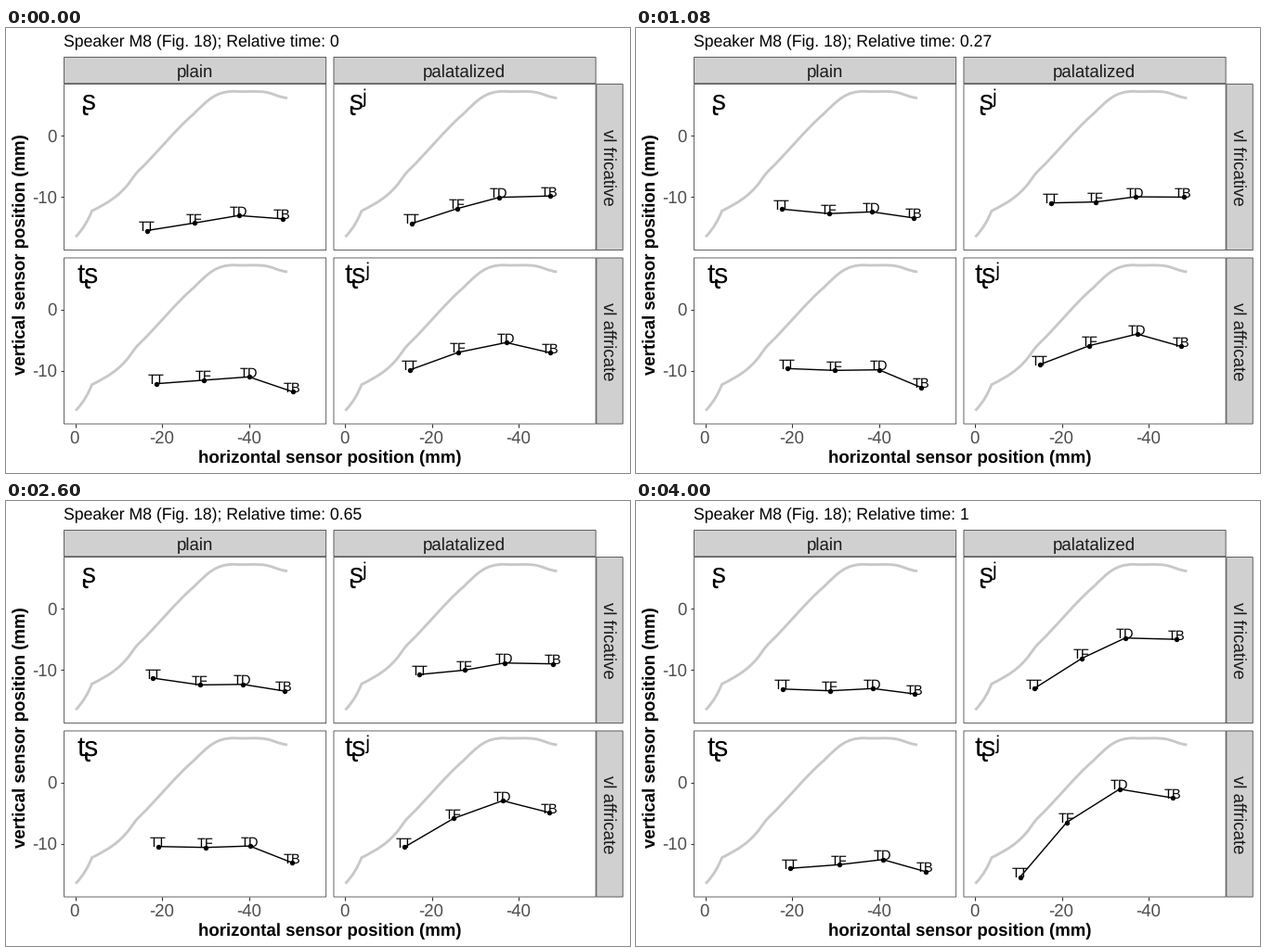
Write a matplotlib script that moves like this. It is 672 by 480 pixels and loops after 4040 ms.

```python
import numpy as np
import matplotlib.pyplot as plt
from matplotlib.animation import FuncAnimation
from matplotlib.patches import PathPatch, Rectangle
from matplotlib.path import Path

plt.rcParams["font.family"] = ["Liberation Sans", "DejaVu Sans"]
plt.rcParams["text.hinting"] = "no_hinting"

W, H, DPI = 672, 480, 96
FRAMES = 101
PX = 72 / DPI  # points per pixel

fig = plt.figure(figsize=(W / DPI, H / DPI), dpi=DPI, facecolor="white")
ax = fig.add_axes([0, 0, 1, 1])
ax.set(xlim=(0, W), ylim=(H, 0))
ax.axis("off")

COLS, ROWS = (62.2, 352.6), (60.2, 247.6)
PANEL_W, PANEL_H, STRIP = 282.9, 179.8, 29.1
INK, TICK_INK, STRIP_INK = "#333333", "#4D4D4D", "#1A1A1A"
SENSORS = ("TT", "TF", "TD", "TB")

# Palate outline in the first panel: start point, then Bezier triples
PALATE = np.array([
    (75, 225.3),
    (84, 216), (89, 206), (92.5, 197.3),
    (111, 188), (121, 181.5), (132, 168),
    (136, 162.5), (139, 157.5), (144, 152.8),
    (163, 134.5), (183, 109), (202, 92.8),
    (218, 77), (226, 68.3), (246, 68.3),
    (258, 69.3), (270, 67.3), (281, 69.5),
    (290, 71.5), (293, 74.3), (303, 75.6),
])


def label(x, y, s, size=14, color="black", **kw):
    opts = dict(ha="center", va="baseline", rotation_mode="anchor")
    return ax.text(x, y, s, fontsize=size, color=color, **{**opts, **kw})


def box(x, y, w, h, fill, lw=0.75):
    # The border lies just inside the box
    ax.add_patch(Rectangle((x + lw / 2, y + lw / 2), w - lw, h - lw, fc=fill,
                           ec=INK, lw=lw * PX, snap=False))


def tick(xs, ys):
    ax.plot(xs, ys, color=INK, lw=1.07 * PX, solid_capstyle="butt")


class Panel:
    """Sensors settle from `start` into `hold`, then leave for `end`."""

    def __init__(self, col, row, symbol, start, hold, end, settle, leave):
        x, y = COLS[col], ROWS[row]
        box(x, y, PANEL_W, PANEL_H, "white")
        curve = Path(PALATE + (x - COLS[0], y - ROWS[0]),
                     [Path.MOVETO] + [Path.CURVE4] * (len(PALATE) - 1))
        ax.add_patch(PathPatch(curve, fill=False, ec="#C8C8C8", lw=2.85 * PX,
                               capstyle="butt"))
        label(x + 26, y + 27.6, symbol, 22.4)
        self.poses = [np.array(p) for p in (start, hold, end)]
        self.settle, self.leave = settle, leave
        self.line, = ax.plot([], [], "o-", color="black", lw=1.42 * PX,
                             ms=5.4 * PX, mew=0)
        self.names = [label(0, 0, s, 11) for s in SENSORS]

    def update(self, t):
        start, hold, end = self.poses
        pose = (hold + (start - hold) * (1 - t) ** self.settle
                + (end - hold) * t ** self.leave)
        self.line.set_data(*pose.T)
        for name, (x, y) in zip(self.names, pose):
            name.set_position((x - 0.3, y + 0.5))


for x, s in zip(COLS, ("plain", "palatalized")):
    box(x, ROWS[0] - STRIP, PANEL_W, STRIP, "#D0D0D0")
    label(x + PANEL_W / 2 - 0.5, 52.6, s, color=STRIP_INK)
    for k in range(3):
        tx = x + 12.4 + 93.7 * k
        tick([tx, tx], [427.4, 431.1])
        label(tx - 0.8, 448.2, f"{-20 * k}", color=TICK_INK)

for y, s in zip(ROWS, ("vl fricative", "vl affricate")):
    box(COLS[1] + PANEL_W, y, STRIP, PANEL_H, "#D0D0D0")
    label(643.4, y + PANEL_H / 2 + 0.5, s, color=STRIP_INK, rotation=-90)
    for k in range(2):
        ty = y + 56.1 + 66 * k
        tick([58.5, 62.2], [ty, ty])
        label(54.8, ty + 6.5, f"{-10 * k}", color=TICK_INK, ha="right")

label(348.7, 469, "horizontal sensor position (mm)", weight="bold")
label(20.8, 244.3, "vertical sensor position (mm)", weight="bold", rotation=90)
title = label(62, 19.6, "", 13.2, ha="left")

panels = [
    Panel(0, 0, "ʂ",
          start=[(151.5, 218.5), (202.5, 210.4), (250.5, 202.3), (297.7, 205.8)],
          hold=[(158.5, 190), (209.2, 197.8), (255, 197.4), (299.7, 204.7)],
          end=[(158, 202.8), (208.8, 204.7), (255.2, 202.3), (300.2, 208.1)],
          settle=5.3, leave=6),
    Panel(1, 0, "ʂʲ",
          start=[(436.8, 210.9), (486.3, 194.7), (531.2, 182.7), (585.7, 181.2)],
          hold=[(450.3, 182.6), (498, 186), (540, 182.4), (591, 183.2)],
          end=[(428.6, 202.4), (480.2, 169.7), (526.8, 147.8), (582.3, 149.2)],
          settle=5, leave=3.5),
    Panel(0, 1, "tʂ",
          start=[(161.6, 383.7), (212.6, 379.9), (261.6, 376.3), (308.6, 392.3)],
          hold=[(163, 366), (214, 368.4), (261.6, 368), (306.8, 387.3)],
          end=[(166.3, 396.2), (218.5, 392.3), (265.8, 386.8), (311.6, 399.7)],
          settle=9, leave=3.5),
    Panel(1, 1, "tʂʲ",
          start=[(435.2, 368.7), (487.3, 349.8), (538.7, 339.3), (586.1, 350.3)],
          hold=[(435.3, 360.3), (489.5, 340.5), (540.5, 328.2), (587.5, 342.3)],
          end=[(413.6, 405.7), (463.8, 346.7), (520.7, 310.8), (578.3, 320.3)],
          settle=5, leave=2.9),
]


def update(i):
    t = i / (FRAMES - 1)
    title.set_text(f"Speaker M8 (Fig. 18); Relative time: {t:g}")
    for panel in panels:
        panel.update(t)


update(0)
anim = FuncAnimation(fig, update, frames=FRAMES, interval=40, repeat=True,
                     repeat_delay=0, blit=False)
plt.show()
```
